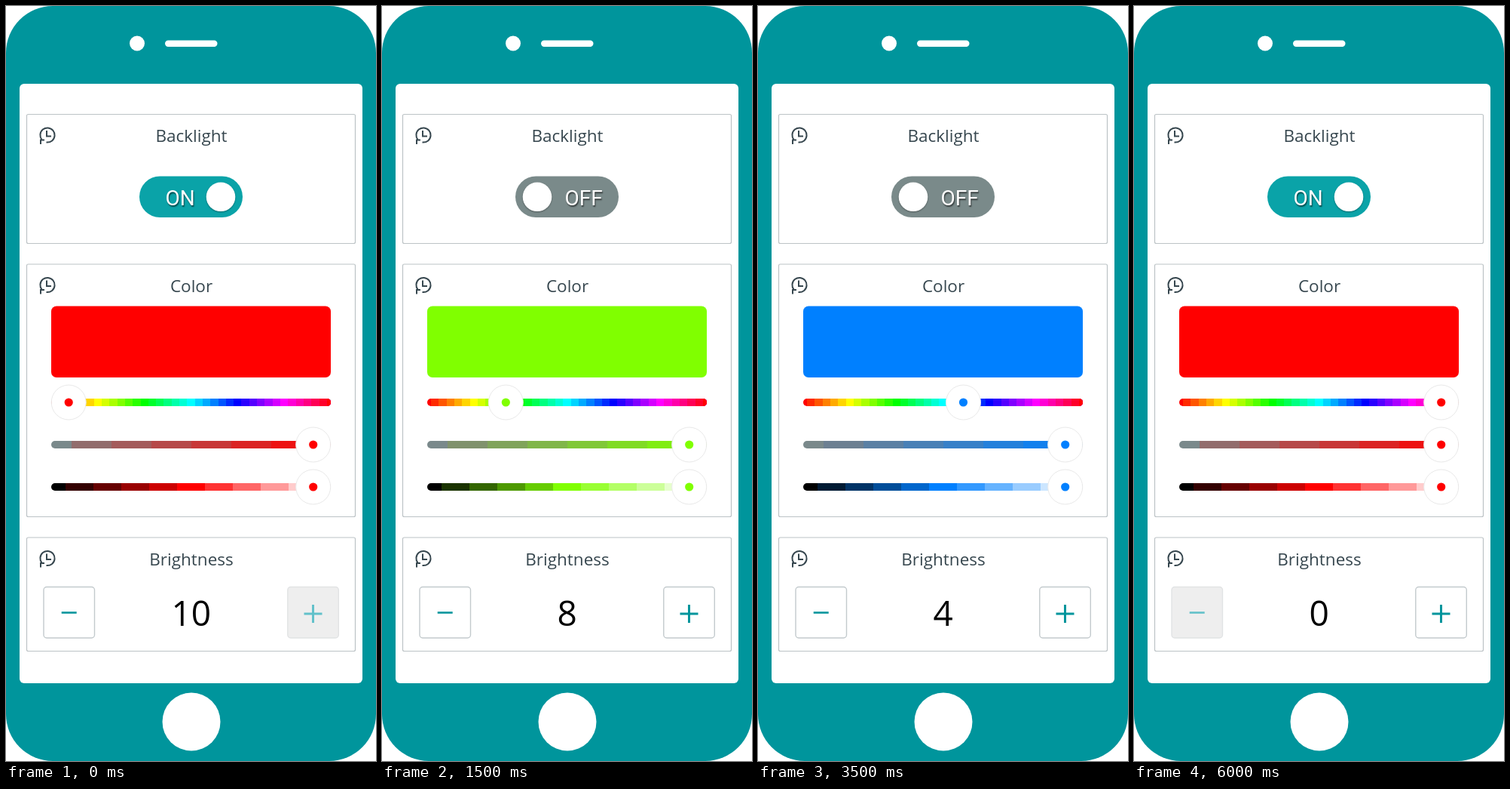
An HTML page with a canvas for the animation above (6.5 s loop, 491 by 1000 pixels).

```html
<!DOCTYPE html>
<html lang="en">
<head>
<meta charset="utf-8">
<title>Backlight remote</title>
<style>
  html, body { margin: 0; width: 100%; height: 100%; overflow: hidden; background: #fff; }
  canvas { display: block; width: 491px; height: 1000px; }
</style>
</head>
<body>
<canvas id="stage"></canvas>
<script>
const W = 491, H = 1000;
const STEP = 500, STEPS = 13;
const TEAL = '#00959c', INK = '#37474f', LINE = '#bcc3c6';
const TRACK = { x: 60, w: 371, h: 10 };

const canvas = document.getElementById('stage');
const dpr = window.devicePixelRatio || 1;
canvas.width = W * dpr;
canvas.height = H * dpr;
const ctx = canvas.getContext('2d');
ctx.scale(dpr, dpr);

const hsl = (h, s = 100, l = 50) => `hsl(${h}, ${s}%, ${l}%)`;

function box(x, y, w, h, r, fill, stroke, width = 1.2) {
  ctx.beginPath();
  ctx.roundRect(x, y, w, h, r);
  if (fill) { ctx.fillStyle = fill; ctx.fill(); }
  if (stroke) { ctx.strokeStyle = stroke; ctx.lineWidth = width; ctx.stroke(); }
}

function disc(x, y, r, fill, stroke) {
  ctx.beginPath();
  ctx.arc(x, y, r, 0, Math.PI * 2);
  ctx.fillStyle = fill;
  ctx.fill();
  if (stroke) { ctx.strokeStyle = stroke; ctx.lineWidth = 1; ctx.stroke(); }
}

function line(points, color, width) {
  ctx.beginPath();
  points.forEach(([x, y]) => ctx.lineTo(x, y));
  ctx.strokeStyle = color;
  ctx.lineWidth = width;
  ctx.stroke();
}

function text(str, x, y, size, color, family = '"Open Sans"', align = 'center') {
  ctx.font = `${size}px ${family}, sans-serif`;
  ctx.textAlign = align;
  ctx.fillStyle = color;
  ctx.fillText(str, x, y);
}

function withShadow(color, blur, dx, dy, draw) {
  ctx.save();
  ctx.shadowColor = color;
  ctx.shadowBlur = blur * dpr;
  ctx.shadowOffsetX = dx * dpr;
  ctx.shadowOffsetY = dy * dpr;
  draw();
  ctx.restore();
}

function historyIcon(x, y) {
  ctx.beginPath();
  ctx.arc(x, y, 9.6, Math.PI * 0.78, Math.PI * 2.55);
  ctx.strokeStyle = INK;
  ctx.lineWidth = 2;
  ctx.stroke();
  line([[x - 4, y + 6.5], [x - 9, y + 6.5], [x - 9, y + 12]], INK, 2);
  line([[x - 1, y - 6], [x - 1, y + 1.5], [x + 5, y + 1.5]], INK, 2);
}

function card(y, h, title) {
  box(27.5, y, 436, h, 2, '#fff', LINE);
  historyIcon(55, y + 27.5);
  text(title, 246, y + 36.5, 22.5, INK);
}

function phone() {
  box(0, 0, W, H, 62, TEAL);
  disc(174, 49.5, 10, '#fff');
  box(211, 45.5, 69.5, 8.5, 4.2, '#fff');
  box(18, 103, 455, 794, 6, '#fff');
  disc(246, 948, 38.5, '#fff');
}

function toggle(on) {
  box(177, 225.5, 137, 54.5, 27.2, on ? '#0aa3a8' : '#7a8a8a');
  withShadow('rgba(0,0,0,.35)', 2, 0, 1, () => disc(on ? 285 : 206, 252.8, 19.3, '#fff'));
  withShadow('rgba(0,0,0,.55)', 1.5, 1, 1.5, () =>
    text(on ? 'ON' : 'OFF', on ? 211.5 : 242.5, 264, 28, '#fff', 'Roboto', 'left'));
}

// Track painted in n equal steps, with half steps at both ends.
function slider(y, n, colorAt, thumb, color) {
  const { x, w, h } = TRACK;
  ctx.save();
  ctx.beginPath();
  ctx.roundRect(x, y - h / 2, w, h, h / 2);
  ctx.clip();
  for (let i = 0; i <= n; i++) {
    const left = Math.round(x + (i - 0.5) * w / n);
    ctx.fillStyle = colorAt(i / n);
    ctx.fillRect(left, y - h / 2, w, h);
  }
  ctx.restore();
  disc(thumb, y, 23, '#fff', '#e9e9e9');
  disc(thumb, y, 5.6, color);
}

function button(x, enabled, plus) {
  box(x, 769.5, 67.5, 67.5, 4, enabled ? '#fff' : '#eee', enabled ? '#c3cacd' : '#e1e3e4', 1.4);
  const color = enabled ? TEAL : '#62c1ca';
  const cx = x + 33.7;
  if (plus) {
    line([[cx - 12, 805], [cx + 12, 805]], color, 3);
    line([[cx, 793], [cx, 817]], color, 3);
  } else {
    line([[cx - 10, 803.5], [cx + 10, 803.5]], color, 2.6);
  }
}

function draw(step) {
  const hue = step * 30;
  const color = hsl(hue);
  const level = Math.max(0, Math.min(10, 11 - step));
  const right = 407.7;

  ctx.clearRect(0, 0, W, H);
  phone();

  card(143.5, 171, 'Backlight');
  toggle(step % 2 === 0);

  card(342, 334.5, 'Color');
  box(60, 397.5, 371, 94.5, 7, color);
  slider(525, 36, t => hsl(t * 360), 83.2 + (right - 83.2) * step / (STEPS - 1), color);
  slider(581, 7, t => t ? hsl(hue, t * 100) : '#7a898b', right, color);
  slider(637, 10, t => hsl(hue, 100, t * 100), right, color);

  card(704, 150.5, 'Brightness');
  button(50, level > 0, false);
  button(373.8, level < 10, true);
  text(level, 245.7, 820.5, 46, '#000');
}

const start = performance.now();
function tick() {
  draw(Math.floor((performance.now() - start) / STEP) % STEPS);
  requestAnimationFrame(tick);
}
tick();
</script>
</body>
</html>
```
